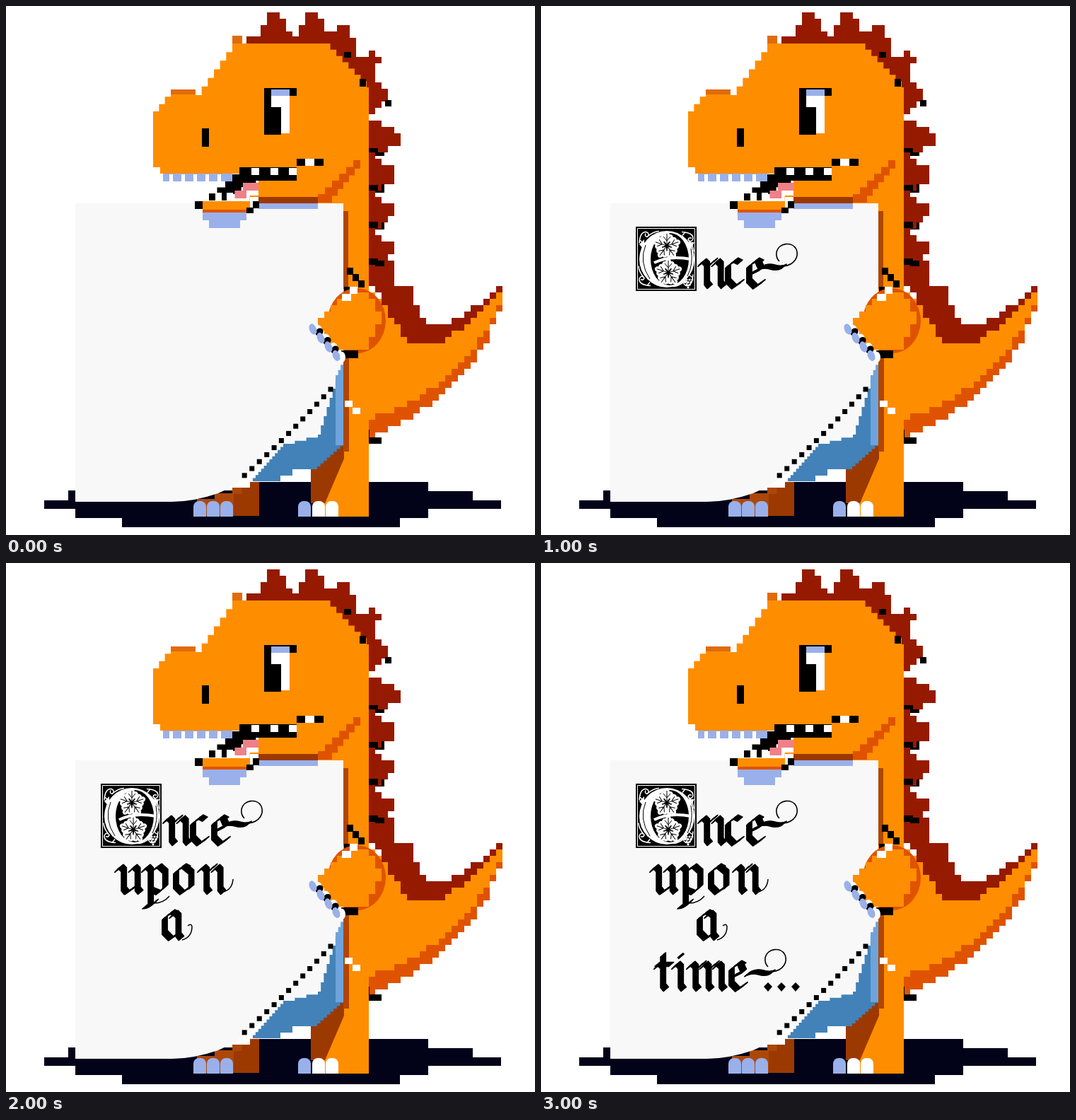
Recreate the animation shown at these times as an HTML page with a canvas. Size 748x748 px, loop 3500 ms.

```html
<!DOCTYPE html>
<html lang="en">
<head>
<meta charset="utf-8">
<title>Storytelling dinosaur</title>
<style>
  html, body { margin: 0; width: 100%; height: 100%; overflow: hidden; background: #fff; }
  canvas { display: block; }
</style>
</head>
<body>
<canvas id="stage" width="748" height="748" role="img" aria-label="Once upon a time..."></canvas>
<script>
const ctx = document.getElementById('stage').getContext('2d');
const CELL = 9, TAU = Math.PI * 2;
const ORANGE = '#ff8d00', RUST = '#df5300', BROWN = '#9c3900', RED = '#961a00';
const LILAC = '#9ab0ea', BLUE = '#4282b8', SKY = '#6fa3dc', NIGHT = '#020219';
const PAPER = '#f8f8f8', BLACK = '#000', WHITE = '#fff';

function rect(color, x, y, w, h) {
  ctx.fillStyle = color;
  ctx.fillRect(x, y, w, h);
}

function fill(color, path) {
  ctx.fillStyle = color;
  ctx.fill(new Path2D(path));
}

function line(color, width, path) {
  ctx.strokeStyle = color;
  ctx.lineWidth = width;
  ctx.stroke(new Path2D(path));
}

function ellipse(color, x, y, rx, ry = rx, turn = 0) {
  ctx.fillStyle = color;
  ctx.beginPath();
  ctx.ellipse(x, y, rx, ry, turn, 0, TAU);
  ctx.fill();
}

function at(x, y, turn, scale, paint) {
  ctx.save();
  ctx.translate(x, y);
  ctx.rotate(turn);
  ctx.scale(scale, scale);
  paint();
  ctx.restore();
}

// Polygon whose slanted sides become pixel stairs.
function stairs(color, points, unit = CELL) {
  const n = points.split(' ').map(Number);
  let [x, y] = n;
  ctx.fillStyle = color;
  ctx.beginPath();
  ctx.moveTo(x, y);
  for (let i = 2; i <= n.length; i += 2) {
    const dx = n[i % n.length] - x, dy = n[(i + 1) % n.length] - y;
    const steps = Math.max(1, Math.round(Math.min(Math.abs(dx), Math.abs(dy)) / unit));
    for (let s = 0; s < steps; s++) {
      ctx.lineTo(x += dx / steps, y);
      ctx.lineTo(x, y += dy / steps);
    }
  }
  ctx.fill();
}

// Fills the grid cells whose centre lies inside a smooth path.
function pixels(color, path) {
  const shape = new Path2D(path);
  ctx.fillStyle = color;
  for (let y = 0; y < 748; y += CELL)
    for (let x = 0; x < 748; x += CELL)
      if (ctx.isPointInPath(shape, x + CELL / 2, y + CELL / 2)) ctx.fillRect(x, y, CELL, CELL);
}

function ground() {
  fill(NIGHT, 'M54 699H88V685H357V673H597V686H660V699H700V711H597V724H557V737H164V724H98V711H54Z');
  rect(WHITE, 388, 640, 43, 33);
}

function legs() {
  stairs('#ad4708', '270 697 345 673 358 673 358 721 270 721');
  stairs(BROWN, '322 690 345 673 358 673 358 721 322 721');
  fill(ORANGE, 'M477 600H513V722H440Z');
  fill(BROWN, 'M431 652L478 610V640L451 703H431Z');
  for (const x of [265, 284, 303, 413, 433, 452]) {
    ctx.fillStyle = x > 420 ? WHITE : LILAC;
    ctx.beginPath();
    ctx.roundRect(x, 700, 18, 22, [8, 8, 0, 0]);
    ctx.fill();
  }
}

function tail() {
  pixels(RUST, 'M500 390L580 460Q640 470 703 388V410Q672 545 510 612Z');
  pixels(ORANGE, 'M500 390L580 460Q640 470 699 392V420Q645 545 500 588Z');
  pixels(RED, 'M513 362H552V395H580V424Q608 488 706 386V398Q645 465 600 480H574Q545 440 513 385Z');
  rect(BLACK, 503, 599, 11, 11);
  rect(BLACK, 513, 610, 18, 9);
}

function spike(x, y, turn) {
  const corner = (along, across) => [
    x - Math.cos(turn) * along - Math.sin(turn) * across,
    y - Math.sin(turn) * along + Math.cos(turn) * across
  ];
  pixels(RED, 'M' + [corner(0, 7), corner(38, 30), corner(52, 30),
    corner(52, -30), corner(38, -30), corner(0, -7)].join('L') + 'Z');
}

function spikes() {
  rect(RED, 340, 43, 120, 14);
  for (const x of [381, 434]) spike(x, 12, -TAU / 4);
  spike(479, 28, -1.3);
  spike(523, 72, -.75);
  spike(543, 124, -.15);
  for (let y = 187; y < 350; y += 52) {
    rect(BLACK, 513, y + 8, 22, 17);
    spike(554 - (y - 187) * .04, y, 0);
    rect(BLACK, 513, y + 14, 13, 9);
  }
  rect(BLACK, 536, 133, 9, 9);
}

function head() {
  rect(ORANGE, 477, 275, 36, 350);
  rect('#b04600', 477, 290, 7, 110);
  rect('#b04600', 477, 490, 8, 140);
  stairs(ORANGE, '208 149 233 118 268 118 268 126 320 53 450 53 510 115 513 115 513 280 357 280 357 237 218 237 218 228 208 228');
  rect('#e06b0b', 233, 118, 35, 7);
  rect('#e06b0b', 320, 42, 14, 11);
  rect(BLACK, 478, 65, 10, 8);
  rect(BLACK, 500, 103, 9, 11);
  for (let i = 0; i < 6; i++) rect(RUST, 491 - i * 10, 218 + i * 9.6, 10 + i * 2, 12);
  rect(BROWN, 357, 270, 84, 9);

  rect(BLACK, 277, 173, 10, 26);
  fill(BLACK, 'M365 116H411V127H375V143H389V182H365Z');
  fill(WHITE, 'M375 127H401V180H389V143H375Z');
  rect(LILAC, 375, 118, 26, 9);
}

function paper() {
  fill(PAPER, 'M98 279H477V503L443 604L395 619Q345 670 300 689Q265 701 235 701H98Z');
  stairs(BLUE, '470 515 477 503 477 622 440 655 405 655 405 664 388 664 388 672 345 672 392 619 441 606', 4);
  stairs(SKY, '466 522 477 500 477 621 463 621', 4);
  for (let i = 0; i < 13; i++) {
    const bow = 1.5 * Math.sin(i / 12 * Math.PI);
    rect(BLACK, 455.5 - i * 10.15 + bow, 538.5 + i * 10.15 + bow, 7, 7);
  }
  rect(LILAC, 357, 279, 84, 8);
  rect(LILAC, 278, 292, 62, 11);
  rect(LILAC, 287, 302, 44, 12);
}

function mouth() {
  rect(LILAC, 222, 237, 98, 11);
  for (let x = 231; x < 310; x += 17) rect(WHITE, x, 238, 5, 11);
  stairs(BLACK, '310 248 330 228 411 228 411 216 449 216 449 226 423 226 411 247 374 247 312 275 287 275 287 265');
  for (const x of [347, 374, 400]) rect(WHITE, x, 229, 11, 10);
  rect(WHITE, 423, 216, 13, 10);
  stairs('#ef8088', '312 272 335 250 357 250 357 261 340 272');
  for (const x of [278, 296, 312]) rect(WHITE, x, 264, 9, 11);
  stairs(ORANGE, '278 276 330 276 374 252 374 270 357 270 345 290 278 290');
  rect(RUST, 278, 288, 65, 4);
  rect(BLACK, 267, 276, 11, 11);
  rect(BLACK, 349, 276, 9, 10);
  rect(BLACK, 340, 285, 10, 8);
}

function arm() {
  for (let i = 0; i < 3; i++) rect(BLACK, 482 + i * 8, 370 + i * 9, 9, 10);
  rect(BLACK, 478, 397, 8, 9);
  ellipse(RUST, 496, 445, 41, 46);
  pixels(ORANGE, 'M445 438L495 399Q528 412 528 445Q525 470 500 490H470Q445 470 445 458Z');
  rect(WHITE, 475, 407, 13, 10);
  rect(WHITE, 486, 397, 11, 10);
  rect(WHITE, 479, 558, 11, 9);
  rect(WHITE, 490, 568, 11, 9);
  rect(BLACK, 474, 487, 24, 11);
  for (let i = 0; i < 4; i++) {
    const x = 434 + i * 11, y = 457 + i * 12.5;
    ellipse(WHITE, x + 7, y + 2, 6, 8);
    if (i < 3) ellipse(BLACK, x + 9, y + 4, 5, 6, .8);
    ellipse(LILAC, x, y, 5, 8, -.4);
  }
}

function flower(x, y) {
  for (let i = 0; i < 5; i++)
    at(x, y, i * TAU / 5 - TAU / 4, 1, () => {
      for (const side of [-1, 0, 1]) ellipse(WHITE, 11 + (side ? 0 : 4), side * 5, 5, 4);
      fill(WHITE, 'M2 0L10-7V7Z');
      line(BLACK, 1, 'M2 0H17M7 0L13-5M7 0L13 5');
    });
}

// Ornate capital: a ring with a crossbar, flowers inside, vines in the corners.
function initial() {
  rect(BLACK, 134, 312, 86, 91);
  line(WHITE, 1, 'M136.5 314.5h81v86h-81z');
  for (let i = 0; i < 4; i++)
    at(177, 357.5, i * TAU / 4, 1, () => {
      line(WHITE, 1.5, 'M-38-22Q-37-39-28-38Q-22-35-27-31Q-31-32-29-36M-27-31Q-18-39-10-39M-38-27l5 4');
    });
  ellipse(WHITE, 178, 358, 39, 40);
  ellipse(BLACK, 182, 358, 27, 37);
  fill(WHITE, 'M146 330l-7 7l7 8zM209 334l8 0l-5 9z');
  line(BLACK, 1, 'M148 338Q138 362 154 386M212 343Q216 365 207 382');
  flower(178, 339);
  flower(180, 377);
  line(WHITE, 4, 'M160 363Q182 352 212 358');
  for (let row = 0; row < 4; row++)
    for (let i = 0; i < 4 - row; i++) ellipse(WHITE, 202 + i * 4 + row * 2, 387 + row * 3.6, 1.6);
}

// Letters are built from shared strokes: upright minims, arches and a round bowl.
const minim = x => `M${x} 9l5-5l4 4v25l4 5`;
const arch = x => `M${x + 9} 12l11-9`;
const bowl = 'M22 6L16 3L6 11V30L14 38L24 31';
const letters = {
  n: [33, minim(0) + arch(0) + minim(18)],
  m: [54, minim(0) + arch(0) + minim(17) + arch(17) + minim(34)],
  i: [21, minim(0) + 'M8-7l2 2'],
  t: [25, minim(0) + 'M9-8V8M1 5H20'],
  u: [38, minim(0) + minim(18) + 'M13 38L27 28'],
  p: [39, minim(0) + 'M9 30V54M9 11L20 3L28 10V30L19 38L9 34'],
  c: [30, bowl],
  e: [30, bowl + 'M8 21L22 14L17 3'],
  o: [40, bowl + 'M16 3L26 11V31'],
  a: [40, bowl + minim(15)]
};

// Broad nib held at 40 degrees.
function pen(path, x, y, scale = 1.08) {
  for (let d = -4.8; d <= 4.8; d += .6)
    at(x + d * .77, y - d * .64, 0, scale, () => line(BLACK, 1.3, path));
}

function word(text, x, y) {
  for (const ch of text) {
    const [advance, path] = letters[ch];
    pen(path, x, y);
    x += advance;
  }
}

function swash(x, y) {
  pen('M0 0Q10-6 20-3Q30 0 37-4', x, y, 1);
  at(x, y, 0, 1, () => line(BLACK, 1.6, 'M36-4C52-6 58-18 54-28C48-40 29-37 26-24Q25-16 30-11'));
}

const parts = [
  initial,
  () => { word('nce', 225, 356); swash(307, 372); },
  () => {
    word('upon', 157, 425);
    pen('M0 8Q10 8 16 0', 196, 478, 1);
    line(BLACK, 1.5, 'M206 481Q222 482 231 471M307 465Q320 462 321 447');
  },
  () => {
    word('a', 218, 490);
    line(BLACK, 1.5, 'M249 533Q263 529 263 514Q262 509 257 513');
  },
  () => { word('time', 163, 562); swash(291, 582); },
  () => [321, 340, 360].forEach(x => fill(BLACK, `M${x - 6} 599l6-6l6 6l-6 7z`))
];

function draw(now) {
  ctx.clearRect(0, 0, 748, 748);
  for (const layer of [ground, legs, tail, spikes, head, paper, mouth, arm]) layer();
  const shown = Math.floor(now % 3500 / 500);
  parts.slice(0, shown).forEach(part => part());
  requestAnimationFrame(draw);
}
draw(performance.now());
</script>
</body>
</html>
```
